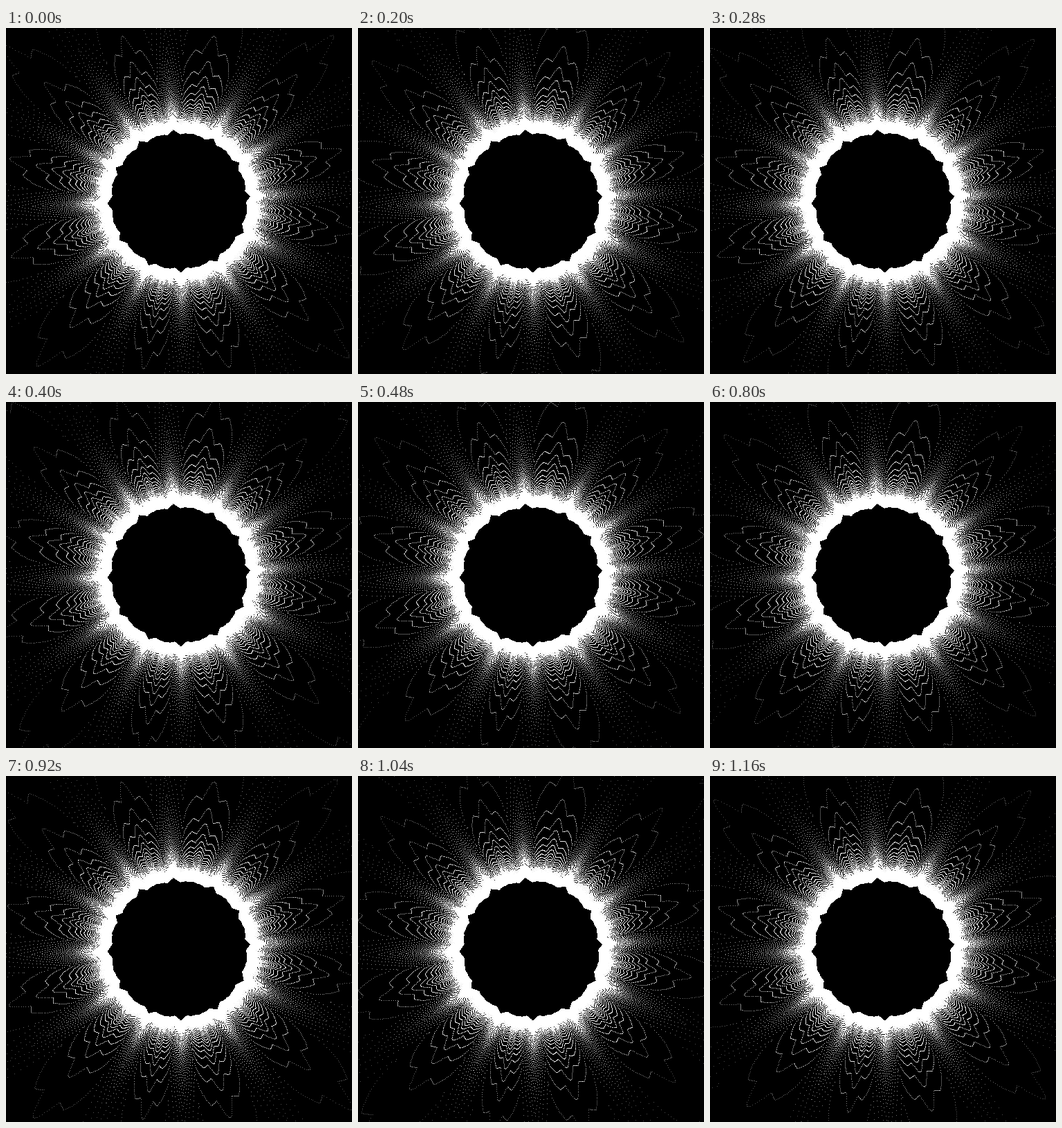
Recreate the animation shown at these times as an HTML page with a canvas. Size 500 by 500 pixels, loop 1.2 s.

```html
<!DOCTYPE html>
<html lang="en">
<head>
<meta charset="utf-8">
<title>Corona</title>
<style>
html, body { margin: 0; width: 100%; height: 100%; overflow: hidden; background: #000; }
canvas { display: block; width: 100vw; height: 100vh; image-rendering: pixelated; }
</style>
</head>
<body>
<canvas id="stage" width="500" height="500"></canvas>
<script>
const SIZE = 500, MID = 250, LOOP = 1200, TICK = 40;
const POINTS = 1500, RINGS = 80, STEP = 0.00123, BASE = 94;
const LEVELS = 4; // rings that pass by in one loop
const TAU = Math.PI * 2;

const ctx = document.getElementById('stage').getContext('2d');
const image = ctx.createImageData(SIZE, SIZE);
const pixels = new Uint32Array(image.data.buffer);
const light = new Float32Array(SIZE * SIZE);

const bump = (x, centre, width) => Math.max(0, 1 - Math.abs(x - centre) / width);

// Twelve tall spikes with a notched petal between each pair.
function profile(angle) {
  const warped = angle + 0.025 * Math.sin(3 * angle + 1) + 0.012 * Math.sin(7 * angle);
  const turn = (warped + 93 * Math.PI / 180) * 12 / TAU;
  const d = Math.abs(turn - Math.round(turn));
  const vary = 1 + 0.04 * Math.sin(2 * angle + 0.6) + 0.03 * Math.sin(5 * angle);
  let g = 0.3 + 0.7 * Math.pow(bump(d, 0, 0.2), 1.3);
  if (d > 0.2) {
    g += 0.28 * Math.sqrt((d - 0.2) / 0.3) - 0.06 * bump(d, 0.41, 0.07);
  }
  return g * vary;
}

const rays = Array.from({ length: POINTS }, (_, i) => {
  const angle = i / POINTS * TAU;
  return { x: Math.cos(angle), y: Math.sin(angle), g: profile(angle) };
});

function draw(time) {
  const shift = time / LOOP * LEVELS % 1;
  light.fill(0);
  for (let k = 1; k <= RINGS; k++) {
    const scale = 1 / (STEP * (k - shift));
    for (const ray of rays) {
      const r = BASE + scale * ray.g;
      if (r > 355) continue;
      const x = Math.floor(MID + r * ray.x);
      const y = Math.floor(MID + r * ray.y);
      if (x < 0 || y < 0 || x >= SIZE || y >= SIZE) continue;
      light[y * SIZE + x] += Math.max(75, Math.min(240, 240 - (r - 140) * 1.25));
    }
  }
  for (let i = 0; i < light.length; i++) {
    const v = Math.min(255, light[i]) | 0;
    pixels[i] = 0xff000000 | v << 16 | v << 8 | v;
  }
  ctx.putImageData(image, 0, 0);
}

const start = performance.now();
let last = -1;
function frame() {
  const tick = Math.floor((performance.now() - start) % LOOP / TICK);
  if (tick !== last) {
    draw(tick * TICK);
    last = tick;
  }
  requestAnimationFrame(frame);
}
frame();
</script>
</body>
</html>
```
